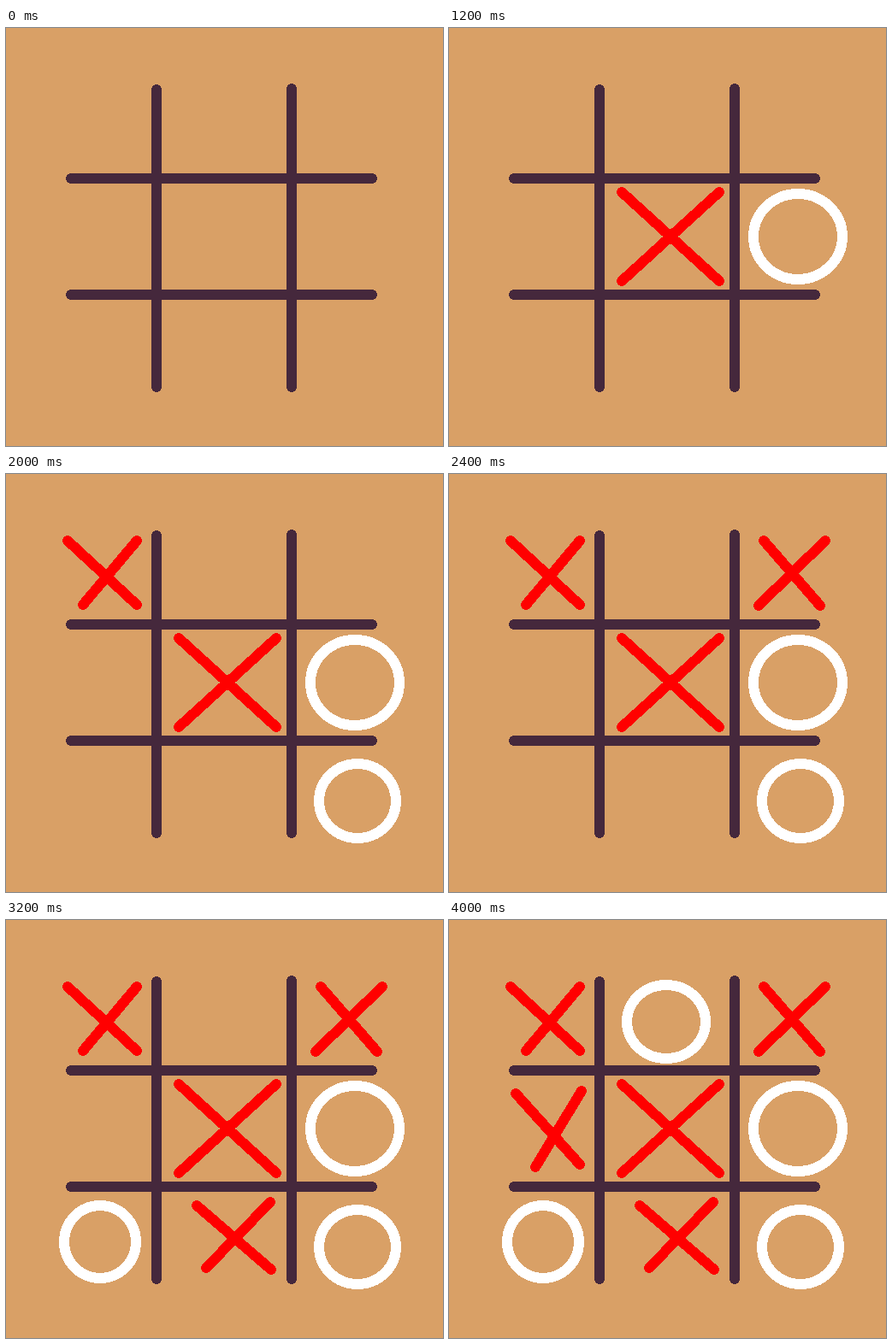
An HTML page for the animation above (4400 ms loop, 511 px wide and 489 px high).

```html
<!DOCTYPE html>
<html lang="en">
<head>
<meta charset="utf-8">
<title>Noughts and crosses</title>
<style>
  html, body { margin: 0; width: 100%; height: 100%; overflow: hidden; background: #d9a066; }
  svg { display: block; width: 100%; height: 100%; }
  path, ellipse { fill: none; stroke-width: 12; stroke-linecap: round; shape-rendering: crispEdges; }
  .grid { stroke: #45283c; }
  #marks path { stroke: #f00; }
  #marks ellipse { stroke: #fff; }
</style>
</head>
<body>
<svg viewBox="0 0 511 489">
  <path class="grid" d="M176 72V420M334 71V420M76 176H428M76 312H428"/>
  <!-- Marks in order of play -->
  <g id="marks">
    <path d="M202 192l114 104m0-104l-114 104"/>
    <ellipse cx="408" cy="244" rx="52" ry="50"/>
    <path d="M72 78l81 75m0-75l-63 75"/>
    <ellipse cx="411" cy="382.5" rx="45" ry="43.5"/>
    <path d="M368 78l66 76m6-76l-78 76"/>
    <ellipse cx="110" cy="376.5" rx="42" ry="42.5"/>
    <path d="M223 334l87 75m-1-79l-75 77"/>
    <ellipse cx="254" cy="119" rx="46" ry="43"/>
    <path d="M78 203l75 83m2-86l-54 89"/>
  </g>
</svg>
<script>
  const LOOP = 4400, FIRST = 800, STEP = 400;
  const marks = [...document.getElementById('marks').children];
  const start = performance.now();

  function draw(t) {
    const played = Math.floor((t - FIRST) / STEP) + 1;
    marks.forEach((mark, i) => {
      mark.style.display = i < played ? '' : 'none';
    });
  }

  function tick() {
    draw((performance.now() - start) % LOOP);
    requestAnimationFrame(tick);
  }
  tick();
</script>
</body>
</html>
```
